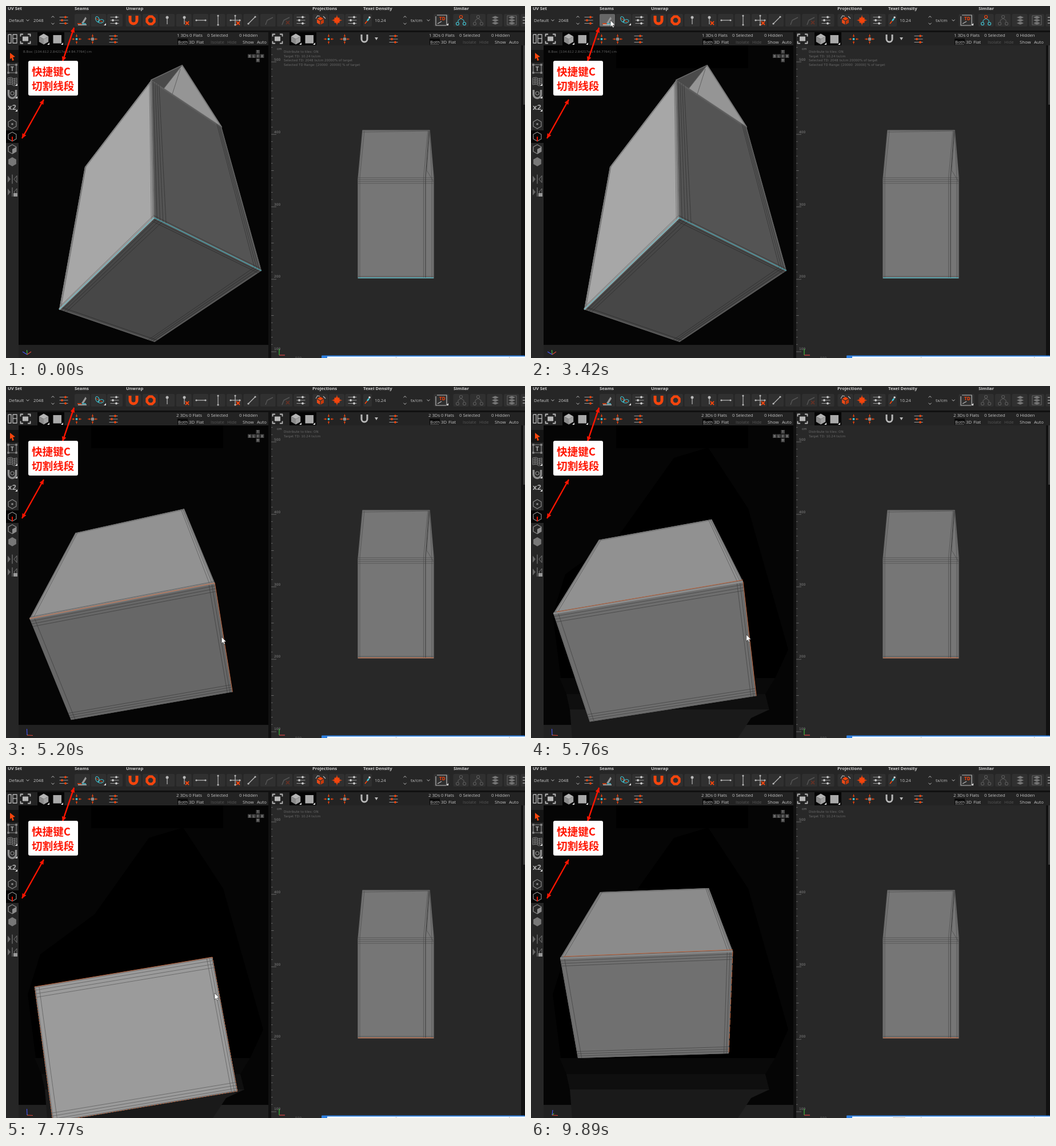
Animation of 908x617 px, one loop 9970 ms. Source, as an HTML page with a canvas:

```html
<!DOCTYPE html>
<html lang="en">
<head>
<meta charset="utf-8">
<title>Cutting a seam</title>
<style>
html, body { margin: 0; width: 100%; height: 100%; overflow: hidden; background: #262626; }
canvas { display: block; }
</style>
</head>
<body>
<canvas id="stage" width="908" height="617"></canvas>
<script>
const c = document.getElementById('stage').getContext('2d');
const LOOP = 9970, STEP = 40, CUT = 3710;
const ORANGE = '#f4450d', CYAN = '#42c3d2', PALE = '#b9b9b9', DIM = '#555', GREY = '#8b8b8b', RED = '#ff1500', GAP = '#111';
const UI = '"Open Sans", "Noto Sans", sans-serif';
const HUD = '"DejaVu Sans", sans-serif';
const HAN = '"Noto Sans CJK SC", "Noto Sans CJK", sans-serif';

const clamp = k => Math.max(0, Math.min(1, k));
const mix = (a, b, k) => a + (b - a) * k;
const mixPoint = (a, b, k) => [mix(a[0], b[0], k), mix(a[1], b[1], k)];
const grey = v => `rgb(${v},${v},${v})`;
const range = (n, f) => Array.from({ length: n }, (_, i) => f(i));
const linear = k => k, speedUp = k => k ** 5, slowDown = k => 1 - (1 - k) ** 4;

// A view of the box: base corners in turn, then the far corners behind the first three.
const view = (side, base, lift, ...pts) => ({ side, base, lift, pts });
const mixView = (a, b, k) => view(mix(a.side, b.side, k), mix(a.base, b.base, k), mix(a.lift, b.lift, k),
  ...a.pts.map((p, i) => mixPoint(p, b.pts[i], k)));
const START = view(167, 71, 62, [93, 532], [259, 371], [447, 464], [260, 589], [138, 282], [254, 130], [377, 212]);
const TILTED = view(145, 109, 0, [39, 399], [371, 343], [394, 543], [103, 588], [119, 268], [316, 232], [335, 380]);
const FACING = view(150, 155, 0, [50, 387], [361, 335], [405, 570], [82, 624], [100, 420], [325, 375], [355, 540]);
const FINAL = view(139, 112, 0, [51, 337], [353, 325], [346, 504], [82, 512], [121, 221], [311, 214], [320, 400]);

const CORNER = [637, 600];
const moves = [
  { from: 750, to: 1430, cursor: [139, 25], bend: [250, 50] },
  { from: 3910, to: 4310, cursor: [331, 437] },
  { from: 4560, to: 5240, cursor: [380, 440], pose: mixView(TILTED, FACING, -.08) },
  { from: 5440, to: 5840, cursor: [370, 427], pose: mixView(TILTED, FACING, .2), ease: speedUp },
  { from: 6210, to: 6770, cursor: [365, 398], pose: FACING, ease: slowDown },
  { from: 7770, to: 8050, cursor: [375, 441], pose: FINAL },
  { from: 9250, to: 9690, cursor: CORNER, bend: [400, 540] }
];

function stateAt(t) {
  let cursor = CORNER, pose = START;
  for (const m of moves) {
    if (t < m.from) break;
    const k = (m.ease || linear)(clamp(Math.floor((t - m.from) / STEP) * STEP / (m.to - m.from)));
    const bend = m.bend || mixPoint(cursor, m.cursor, .5);
    cursor = mixPoint(mixPoint(cursor, bend, k), mixPoint(bend, m.cursor, k), k);
    if (m.pose) pose = mixView(pose, m.pose, k);
  }
  return { cursor, pose };
}

function rect(x, y, w, h, fill, r = 0) {
  c.fillStyle = fill;
  c.beginPath();
  c.roundRect(x, y, w, h, r);
  c.fill();
}
function trace(pts) {
  c.beginPath();
  pts.forEach(p => c.lineTo(p[0], p[1]));
}
function poly(pts, fill, stroke, w = 1) {
  trace(pts);
  c.closePath();
  if (fill) { c.fillStyle = fill; c.fill(); }
  if (stroke) { c.strokeStyle = stroke; c.lineWidth = w; c.lineJoin = 'round'; c.stroke(); }
}
function line(color, w, ...pts) {
  trace(pts);
  c.strokeStyle = color;
  c.lineWidth = w;
  c.stroke();
}
function dot(x, y, r, fill, stroke) {
  c.beginPath();
  c.arc(x, y, r, 0, 7);
  if (fill) { c.fillStyle = fill; c.fill(); }
  if (stroke) { c.strokeStyle = stroke; c.lineWidth = 1.2; c.stroke(); }
}
function text(s, x, y, color = '#c4c4c4', font = '7.7px ' + UI) {
  c.font = font;
  c.fillStyle = color;
  c.fillText(s, x, y);
}
const ring = (n, x, y, r, turn = 0) => range(n, i => {
  const a = (i + turn) * 2 * Math.PI / n;
  return [x + r * Math.sin(a), y - r * Math.cos(a)];
});
const hex = (x, y, r) => ring(6, x, y, r);
const box = (x, y, r) => [[x - r, y - r], [x + r, y - r], [x + r, y + r], [x - r, y + r]];

function sliders(x, y, knob) {
  for (const i of [-1, 0, 1]) {
    line('#9a9a9a', 1, [x - 7.5, y + i * 5.5], [x + 7.5, y + i * 5.5]);
    dot(x + (i ? 3 : -3), y + i * 5.5, 1.9, knob);
  }
}
function chevron(x, y, d) { line(PALE, 1, [x - 2.5, y - d], [x, y + d], [x + 2.5, y - d]); }
function cross(x, y, color = ORANGE) {
  line(color, 1.8, [x - 3, y - 3], [x + 3, y + 3]);
  line(color, 1.8, [x + 3, y - 3], [x - 3, y + 3]);
}
function cube(x, y, r, a, b, d) {
  const h = hex(x, y, r), m = [x, y];
  poly([h[5], h[0], h[1], m], a);
  poly([h[5], m, h[3], h[4]], b);
  poly([h[1], m, h[3], h[2]], d);
}
function corner(x, y) { poly([[x, y], [x, y - 4], [x - 4, y]], '#ddd'); }
function burst(x, y, center, r) {
  for (const [dx, dy] of [[1, 0], [-1, 0], [0, 1], [0, -1]]) {
    line(ORANGE, 1, [x + dx * 4, y + dy * 4], [x + dx * 8.5, y + dy * 8.5]);
    poly([[x + dx * 3.5, y + dy * 3.5], [x + dx * 6 + dy * 2, y + dy * 6 + dx * 2], [x + dx * 6 - dy * 2, y + dy * 6 - dx * 2]], ORANGE);
  }
  dot(x, y, r, center);
}
function magnet(x, y, color, w, r = 5) {
  c.beginPath();
  c.moveTo(x - r, y - 7);
  c.lineTo(x - r, y + 1);
  c.arc(x, y + 1, r, Math.PI, 0, true);
  c.lineTo(x + r, y - 7);
  c.strokeStyle = color; c.lineWidth = w; c.stroke();
}
function nodes(x, y, color, top) {
  line(color, 1, [x - 5, y + 5], [x - 5, y], [x, y - 3], [x + 5, y], [x + 5, y + 5]);
  dot(x, y - 6, 2.5, '#2e2e2e', top);
  dot(x - 6, y + 6, 2.5, '#2e2e2e', color);
  dot(x + 6, y + 6, 2.5, '#2e2e2e', color);
}
function frameIcon(x, y) {
  rect(x - 5, y - 4, 10, 8, PALE);
  for (const sx of [-1, 1]) for (const sy of [-1, 1])
    line(PALE, 1.8, [x + sx * 4, y + sy * 8], [x + sx * 8.5, y + sy * 8], [x + sx * 8.5, y + sy * 4]);
}
function bar(a, b) { line(PALE, 1.2, a, b); dot(...a, 1.6, PALE); dot(...b, 1.6, PALE); }
function buttons(x, n, step = 28.5) {
  for (let i = 0; i < n; i++) rect(x + i * step - 13.5, 14, 27, 22, '#303030', 2);
}

function seamTools(t) {
  buttons(133.5, 3);
  if (t >= 1380 && t < 3910) rect(120, 14, 27, 22, t < 3420 ? '#777' : '#666', 2);
  line('#ddd', 1.2, [126, 33], [141, 33]);
  line(ORANGE, 1.5, [125, 31], [132, 31]);
  line(CYAN, 1.5, [133, 31], [140, 31]);
  poly([[132, 30], [139, 19], [141, 22], [136, 30]], '#999');
  c.save(); c.translate(163, 25); c.rotate(.5);
  line(ORANGE, 1, [-8, 0], [8, 0]);
  for (const s of [-1, 1]) {
    c.beginPath(); c.ellipse(s * 3.5, 0, 5, 3, -s * .7, 0, 7);
    c.strokeStyle = CYAN; c.lineWidth = 1.1; c.stroke();
  }
  c.restore();
  corner(175, 34);
  sliders(190, 25, '#ccc');
}
function unwrapTools() {
  buttons(223, 11, 29.4);
  magnet(223, 24, ORANGE, 5, 6);
  poly(ring(8, 253, 25, 7, .5), null, ORANGE, 4.5);
  for (const x of [282, 312]) { line(PALE, 1.2, [x, 19], [x, 32]); dot(x, 20, 2.5, PALE); }
  cross(317, 30);
  bar([333, 25], [349, 25]);
  bar([371, 17], [371, 33]);
  bar([401, 17], [401, 33]); bar([393, 25], [409, 25]); cross(406, 30);
  bar([424, 31], [436, 19]);
  for (const x of [460, 489]) line(DIM, 1.5, [x - 6, 33], [x - 3, 25], [x + 7, 20]);
  cross(493, 29, '#613025');
  sliders(516, 25, '#ccc');
}
function projectionTools() {
  buttons(550, 3);
  cube(550, 26, 7, ORANGE, '#e84a18', '#c73a0c');
  line('#303030', 1.3, [544, 22.5], [550, 26], [550, 33]);
  line('#303030', 1.3, [550, 26], [556, 22.5]);
  line(PALE, 1.1, [542, 22], [545, 17], [549, 18]);
  line(PALE, 1.1, [555, 18], [559, 22]);
  burst(579, 25, ORANGE, 0);
  poly(box(579, 25, 4.5), ORANGE);
  sliders(606, 25, '#ccc');
}
function densityTools() {
  rect(625, 14, 15, 22, '#303030', 2);
  line(ORANGE, 1.6, [628, 31], [632, 26]);
  line(CYAN, 2.6, [632, 26], [635, 22]);
  dot(636, 20, 1.8, '#ddd');
  text('10.24', 645, 27.5); chevron(698, 19, -1.3); chevron(698, 31, 1.3);
  text('tx/cm', 708, 27.5); chevron(739, 25, 1.3);
  buttons(762, 1);
  line(PALE, 1.2, [752, 18], [752, 34], [770, 34]);
  line(PALE, 1.2, [754, 16], [771, 16], [771, 33]);
  text('TD', 758, 25, ORANGE, 'bold 8px ' + UI);
  line(PALE, 1.2, [755, 31], [762, 27]);
  corner(774, 34);
}
function similarTools(t) {
  buttons(796, 5, 29.5);
  nodes(796, 25, t < CUT ? CYAN : '#5a5a5a', t < CUT ? ORANGE : '#5a5a5a');
  nodes(826, 25, '#5a5a5a', '#5a5a5a');
  for (const x of [856, 885])
    for (const y of [30, 25, 20]) poly([[x - 7, y], [x, y - 3], [x + 7, y], [x, y + 3]], '#777', '#303030', .7);
  poly(box(885, 25, 8), null, '#666');
  for (const y of [20, 25, 30]) line(PALE, 1.2, [904, y], [908, y]);
}
function topBar(t) {
  [['UV Set', 3], ['Seams', 120], ['Unwrap', 210], ['Projections', 536], ['Texel Density', 625], ['Similar', 783]]
    .forEach(([s, x]) => text(s, x, 7, '#cfcfcf', 'bold 7.7px ' + UI));
  text('Default', 5, 27.5); chevron(38, 25, 1.3);
  text('2048', 48, 27.5); chevron(82, 19, -1.3); chevron(82, 31, 1.3);
  sliders(101, 25, ORANGE);
  seamTools(t);
  unwrapTools();
  projectionTools();
  densityTools();
  similarTools(t);
}

function panelHeader(dx, t) {
  frameIcon(34 + dx, 57.5);
  rect(55 + dx, 46, 47, 23, '#050505');
  cube(66 + dx, 58, 9.5, '#b5b5b5', '#8c8c8c', '#a1a1a1');
  rect(82.5 + dx, 51, 14.5, 14.5, '#aaa');
  corner(76 + dx, 68); corner(100 + dx, 68);
  burst(123.5 + dx, 58, CYAN, 2);
  burst(151.5 + dx, 58, GREY, 3);
  const cut = t >= CUT;
  text((cut ? 2 : 1) + ' 3Ds 0 Flats', (cut ? 298 : 299) + dx, 54);
  text('0 Selected', 352 + dx, 54);
  text('0 Hidden', 408 + dx, 54);
  rect(300 + dx, 57, 18, 11.5, '#0b0b0b');
  line('#777', .8, [301 + dx, 67.5], [317 + dx, 67.5]);
  [['Both', 301], ['3D', 320], ['Flat', 333], ['Show', 414], ['Auto', 439]].forEach(([s, x]) => text(s, x + dx, 65.5));
  text('Isolate', 358 + dx, 65.5, '#565656');
  text('Hide', 387 + dx, 65.5, '#565656');
}

function toolbar() {
  rect(0, 77, 22, 22, '#141414');
  rect(0, 218, 22, 22, '#050505');
  for (const [x, w] of [[4, 5], [12, 7]]) line(PALE, 1.3, [x, 50], [x + w, 50], [x + w, 65], [x, 65], [x, 50]);
  line(PALE, 1.3, [12, 57], [19, 57]);
  poly([[7, 82], [16, 89], [12, 90], [14, 95], [11, 96], [10, 91], [7, 93]], ORANGE);
  poly(box(11, 110, 7), null, GREY, 1.2);
  for (const [x, y] of box(11, 110, 7)) rect(x - 1.7, y - 1.7, 3.4, 3.4, GREY);
  text('T', 8, 114, '#aaa', 'bold 10px ' + UI);
  for (let i = 0; i < 5; i++) {
    line(GREY, .9, [3, 126 + i * 3], [9, 125 + i * 3], [14, 128 + i * 3], [19, 126 + i * 3]);
    line(GREY, .9, [3 + i * 4, 126], [3 + i * 4, 138]);
  }
  magnet(11, 154, GREY, 3.5, 6.5);
  dot(11, 153, 3, null, GREY);
  text('x2', 3, 182, '#aaa', 'bold 13px ' + UI);
  for (const y of [140, 162, 185]) corner(20, y);
  for (const y of [207, 229, 251]) poly(hex(11, y, 8), null, GREY, 1.2);
  dot(11, 207, 1.8, GREY);
  line(RED, 1.8, [11, 229], [11, 237]);
  poly([[11, 251], [18, 247], [18, 255], [11, 259]], GREY);
  poly(hex(11, 273, 8), '#777');
  for (const y of [303.5, 326]) {
    poly([[3, y - 6], [3, y + 6], [8, y]], '#666');
    line('#888', 1, [11, y - 8], [11, y + 8]);
    poly([[19, y - 6], [19, y + 6], [14, y]], null, '#777');
  }
  rect(13, 328, 7, 6, '#999');
}

function uvView(t) {
  rect(464, 69, 437, 548, '#282828');
  const hud = ['Distribute to tiles: ON', 'Target TD: 10.24 tx/cm'];
  if (t < CUT) hud.push('Selected TD: 2048 tx/cm 20000% of target', 'Selected TD Range: [20000  20000] % of target');
  hud.forEach((s, i) => text(s, 486, 82.3 + i * 7.4, '#686868', '5.6px ' + HUD));
  text('cm', 474, 77, '#8a8a8a', '5.6px ' + HUD);
  for (let i = -2; i < 41; i++) {
    const y = 98 + i * 12.7;
    line('#777', .8, [464, y], [i % 10 ? i % 5 ? 466.5 : 468.5 : 473, y]);
  }
  for (let i = 0; i < 5; i++) text(500 - i * 100, 469, 96 + i * 126.8, '#858585', '5.9px ' + HUD);
  text('500', 506, 619, '#666', '5.9px ' + HUD);

  const ink = '#4c4c4c', peak = [741, 219];
  poly([[624, 218], [741, 218], [748, 300], [748, 477], [616, 477], [616, 304]], '#767676', '#666', 1.6);
  for (let y = 301; y < 312; y += 3.3) line(ink, .7, [616, y], [748, y]);
  line(ink, .7, [627, 219], [619, 301], [619, 477]);
  line(ink, .7, [624, 221], peak);
  line(ink, .7, [616, 474], [748, 474]);
  line(ink, .7, [738, 219], [730.5, 301], [730.5, 477]);
  line('#3e3e3e', 1.1, [740, 219], [734, 301], [734, 477]);
  line(ink, .7, peak, [736, 288], [748, 308]);
  line(ink, .7, peak, [745, 304], [745, 477]);
  line(t < CUT ? CYAN : '#cf6a3d', 1.2, [616, 476.5], [748, 476.5]);
  line('#3cbc3c', 1.2, [478, 612], [478, 601]);
  line('#d44', 1.2, [478, 612], [488, 612]);
}

function area(p) {
  return p.reduce((sum, a, i) => { const b = p[(i + 1) % p.length]; return sum + a[0] * b[1] - b[0] * a[1]; }, 0);
}
// A quad facing the viewer, with a rim inside its outline and wire lines across it.
function face(q, shade, us, vs) {
  if (area(q) <= 0) return;
  poly(q, grey(shade));
  c.save();
  c.clip();
  poly(q, null, grey(mix(shade, 100, .6)), 4);
  const at = (u, v) => mixPoint(mixPoint(q[0], q[1], u), mixPoint(q[3], q[2], u), v);
  const ink = grey(shade * .6);
  us.forEach(u => line(ink, .75, at(u, 0), at(u, 1)));
  vs.forEach(v => line(ink, .75, at(0, v), at(1, v)));
  c.restore();
}
const near = (n, gap) => range(n, i => (i + 1) * gap);
const far = (n, gap) => near(n, gap).map(v => 1 - v);

function model(t, { side, base, lift, pts }) {
  const [a, b, d, e, farA, farB, farD] = pts;
  if (lift > 15) {
    const ridge = mixPoint(farB, farD, .44);
    ridge[1] -= lift;
    poly([farB, ridge, farD], '#959595', '#777', 2);
    poly([farB, ridge, mixPoint(farB, farD, .18)], '#4a4a4a', '#666', 1);
    line('#555', .8, [ridge[0] - 3, ridge[1] + 6], mixPoint(farB, farD, .3));
  }
  const lid = [a, farA, farB, b], open = area(lid) > 0;
  face([b, farB, farD, d], 84, near(1, .015), [...near(4, .028), ...far(3, .022)]);
  face(lid, side, near(1, .02), [...near(1, .02), ...far(2, .014)]);
  face([a, b, d, e], base, [...near(1, .025), ...far(2, .016)], [...near(3, .026), ...far(3, .022)]);
  if (open) line(grey(side * .97), 3, a, b);

  const seam = t < CUT ? CYAN : '#bd633c', up = open && lift < 1 ? 3 : 0;
  line(seam, 1, [a[0] + up * 2, a[1] - up], [b[0], b[1] - up]);
  c.setLineDash(open ? t > 7770 ? [9, 3] : [] : [3, 2]);
  line(seam, 1, b, d);
  if (!open) line(seam, 1, d, e, a);
  c.setLineDash([]);
}

// Darker trail left where the box was turned.
function trail() {
  poly([[310, 108], [250, 126], [155, 260], [60, 330], [38, 400], [52, 512], [427, 512], [450, 462], [380, 215]], '#000');
  poly([[50, 512], [427, 512], [410, 540], [62, 540]], '#090909');
  poly([[62, 540], [410, 540], [417, 568], [68, 568]], '#0f0f0f');
  poly([[68, 567], [417, 567], [385, 582], [362, 617], [72, 617]], '#1a1a1a');
}

function gizmo(t) {
  const late = t >= 7900, turned = t >= 5000;
  const o = [37, turned ? 612 : 611];
  line('#45c845', 1.1, o, late ? [40, 609] : turned ? [38, 611] : [36.5, 603]);
  line('#4a58ff', 1.1, o, late ? [38, 603] : turned ? [36.5, 601] : [29, 606]);
  line('#e0443a', 1.1, o, turned ? [47, 612.5] : [44, 606]);
}

function viewport(t, pose) {
  rect(22, 69, 437, 548, '#050505');
  rect(22, 594, 437, 23, '#212121');
  if (t >= 2510) rect(149, 69, 231, 40, '#000');
  if (t >= 5240) trail();
  if (t < CUT) text('B.Box: [104.612 2.84217e-14 84.7764] cm', 30, 82.3, '#5f5f5f', '5.6px ' + HUD);
  const key = (s, x, y) => { rect(x, y, 6.5, 6.5, '#444'); text(s, x + 1.6, y + 5.3, '#aaa', '5px ' + UI); };
  [...'BLFR'].forEach((s, i) => key(s, 423 + i * 7.3, 84.5));
  key('T', 437.5, 77);
  key('B', 437.5, 92);
  model(t, pose);
  gizmo(t);
}

function arrow(a, b) {
  const k = Math.atan2(b[1] - a[1], b[0] - a[0]);
  line(RED, 2.4, a, b);
  for (const [p, r] of [[a, k], [b, k + Math.PI]])
    poly([p, ...[.45, -.45].map(s => [p[0] + 9 * Math.cos(r + s), p[1] + 9 * Math.sin(r + s)])], RED);
}
function callout() {
  arrow([119, 38], [99, 97]);
  arrow([66, 164], [28, 232]);
  rect(39, 96, 87, 61, '#fff', 3);
  ['快捷键C', '切割线段'].forEach((s, i) => text(s, 45, 122 + i * 24.5, RED, '900 18.6px ' + HAN));
}

function taskbar(t) {
  rect(552, 612.5, 356, 5, '#2f80e0', 1);
  rect(562, 614.5, 346, 3, '#fff');
  for (const x of [682, 880]) rect(x, 614.5, 1, 3, '#bbb');
  if (t >= 9690) rect(633, 614.5, 22, 3, '#ddd');
}

function pointer([x, y]) {
  poly([[0, 0], [0, 11.5], [2.6, 9.2], [4.4, 13], [6.2, 12.2], [4.5, 8.5], [8, 8.3]].map(p => [p[0] + x, p[1] + y]), '#fff', '#222', .6);
}

function draw(t) {
  const { cursor, pose } = stateAt(t);
  rect(0, 0, 908, 617, '#262626');
  rect(0, 43, 908, 3, GAP);
  rect(0, 46, 908, 23, '#232323');
  rect(459, 46, 5, 571, GAP);
  rect(901, 69, 7, 548, GAP);
  rect(905, 69, 3, 104, '#3d3d3d');
  topBar(t);
  viewport(t, pose);
  uvView(t);
  panelHeader(0, t);
  panelHeader(441, t);
  sliders(188, 58, ORANGE);
  magnet(627, 57, PALE, 3);
  poly([[645, 55], [651, 55], [648, 60]], PALE);
  sliders(678, 58, ORANGE);
  toolbar();
  callout();
  taskbar(t);
  if (t >= 750 && t < 9890) pointer(cursor);
}

const begin = performance.now();
function tick() {
  draw((performance.now() - begin) % LOOP);
  requestAnimationFrame(tick);
}
tick();
</script>
</body>
</html>
```
